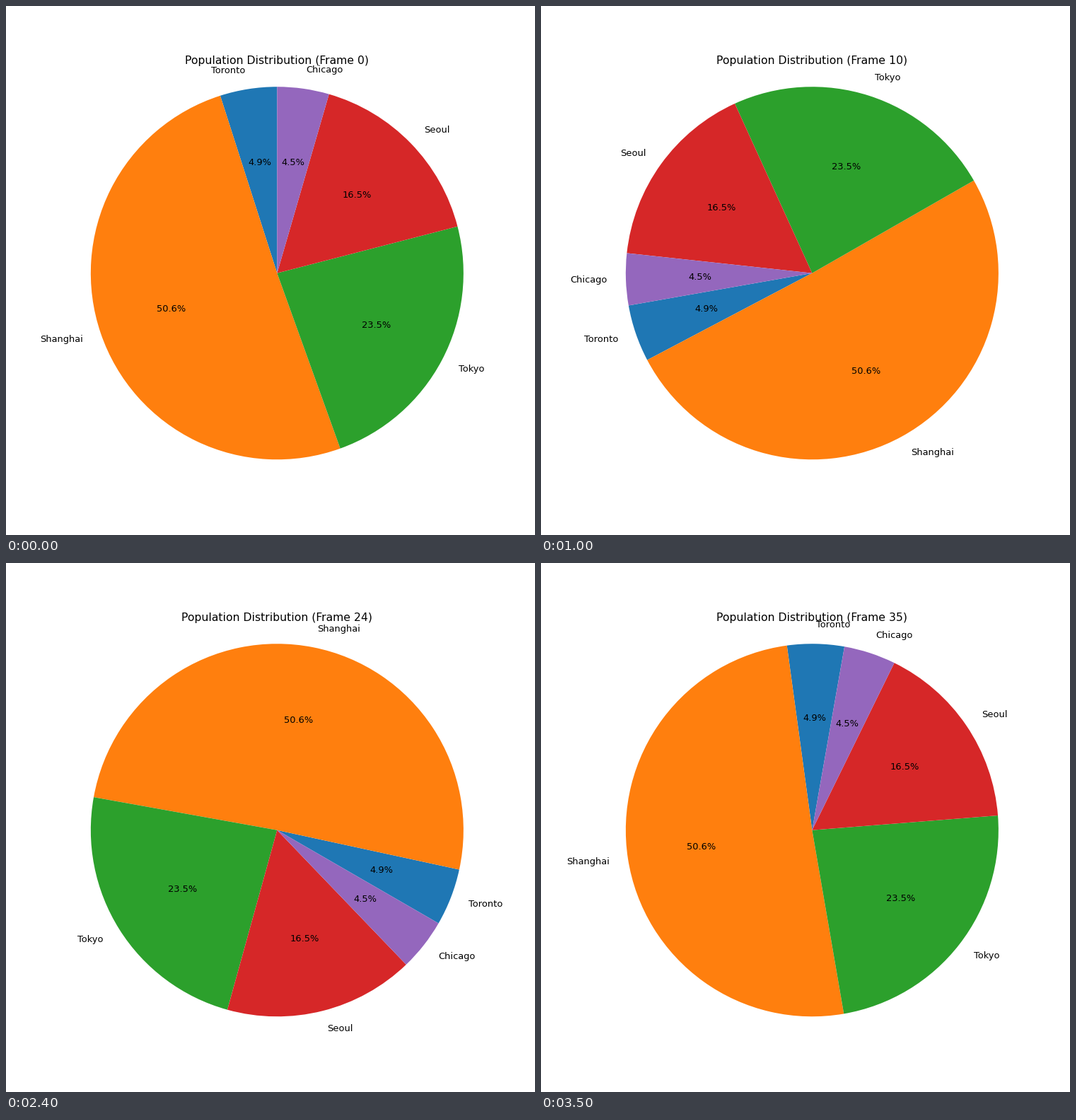
A matplotlib script for the animation above (3600 ms loop, 748x748 px).

```python
import matplotlib.pyplot as plt
from matplotlib.animation import FuncAnimation

CITIES = ["Toronto", "Shanghai", "Tokyo", "Seoul", "Chicago"]
MILLIONS = [2.93, 30.0, 13.96, 9.776, 2.665]
COLORS = ["tab:blue", "tab:orange", "tab:green", "tab:red", "tab:purple"]
FRAMES = 36
STEP = 360 / FRAMES

plt.rcParams["font.family"] = "DejaVu Sans"
fig, ax = plt.subplots(figsize=(8, 8), dpi=93.5)
box = ax.get_position()
HALF_W = 1.1
HALF_H = HALF_W * box.height / box.width


def update(i):
    ax.clear()
    ax.pie(MILLIONS, labels=CITIES, colors=COLORS, autopct="%1.1f%%",
           startangle=90 + STEP * i)
    # Fill the full axes width while keeping the pie round.
    ax.set_aspect("auto")
    ax.set(xlim=(-HALF_W, HALF_W), ylim=(-HALF_H, HALF_H))
    ax.set_title(f"Population Distribution (Frame {i})")


anim = FuncAnimation(fig, update, frames=FRAMES, init_func=lambda: update(0),
                     interval=100, repeat=True, repeat_delay=0)
plt.show()
```
